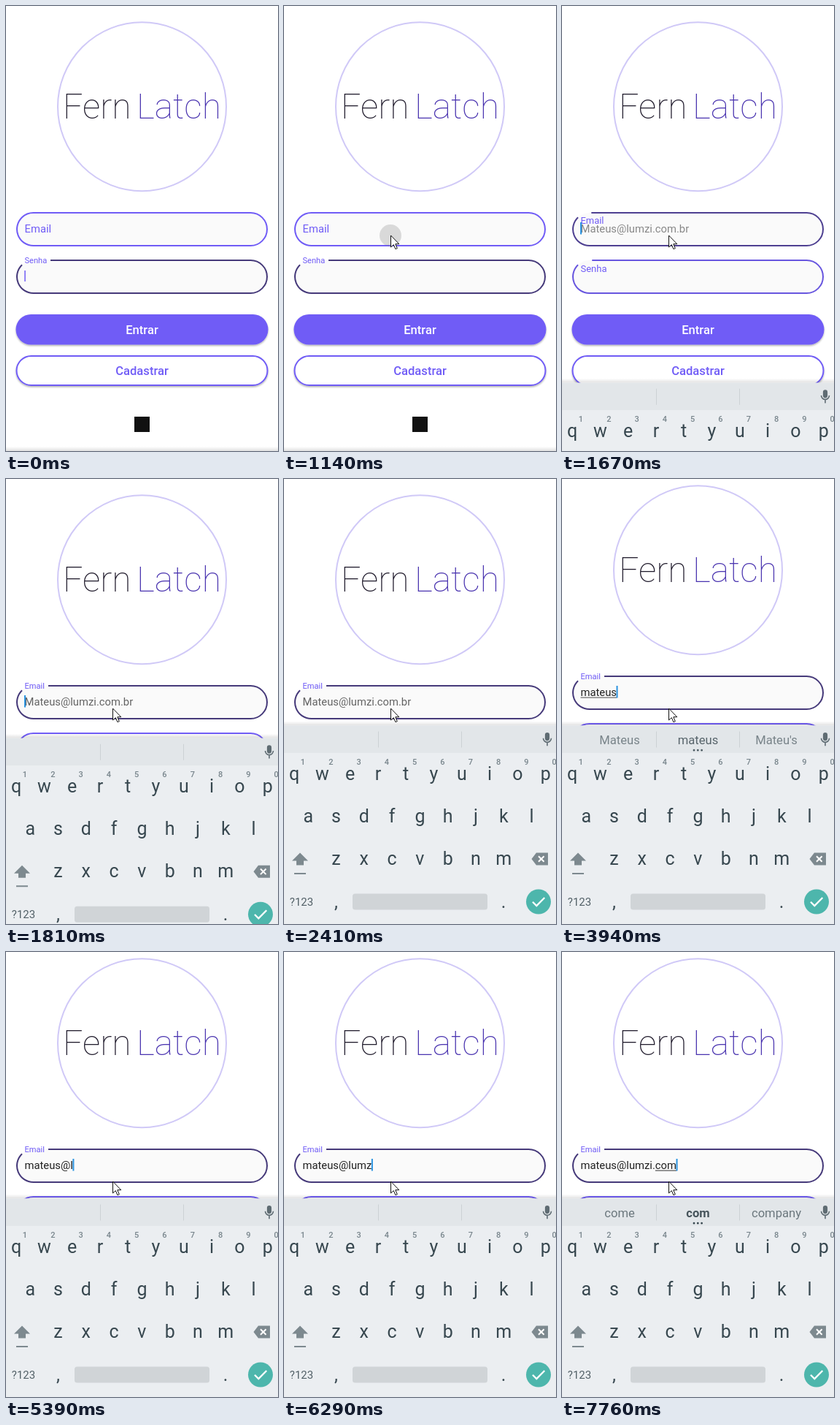
Animation of 373x609 px, one loop 8 s. Source, as an HTML page:

```html
<!DOCTYPE html>
<html lang="pt-BR">
<head>
<meta charset="utf-8">
<title>Login</title>
<style>
html, body { margin: 0; width: 100%; height: 100%; overflow: hidden; background: #fff; }
svg { display: block; width: 100%; height: 100%; font-family: Roboto, sans-serif; }
.mid { text-anchor: middle; }
.field { fill: #fafafa; }
.ring { fill: none; stroke-width: 2; }
.input { font-size: 14.8px; }
.label { fill: #705cf6; }
.btn { font-size: 16.6px; font-weight: 500; text-anchor: middle; }
#keys { fill: #37474f; }
#tips { font-size: 16.6px; text-anchor: middle; fill: #6b777d; }
.icon { fill: #7d898f; }
</style>
</head>
<body>
<svg viewBox="0 0 373 609">
  <defs>
    <linearGradient id="shade" x2="0" y2="1">
      <stop stop-opacity="0"/><stop offset="1" stop-opacity=".12"/>
    </linearGradient>
    <filter id="soft" x="-5%" y="-20%" width="110%" height="150%">
      <feDropShadow dx="0" dy="1.5" stdDeviation="1.1" flood-opacity=".32"/>
    </filter>
  </defs>

  <g id="page">
    <circle cx="186.5" cy="137.7" r="115.5" fill="none" stroke="#d0c9f7" stroke-width="2"/>
    <g font-size="48" font-weight="100">
      <text x="78" y="154" fill="#1f1a2b">Fern</text>
      <text x="179" y="154" fill="#4b35b0">Latch</text>
    </g>

    <rect class="field" x="15" y="283" width="343" height="45" rx="22.5"/>
    <path class="ring" id="emailRing"/>
    <text class="label" id="emailLabel" x="25.5">Email</text>
    <text class="input" id="hint" x="25.5" y="309.8">Mateus@lumzi.com.br</text>
    <text class="input" id="typed" x="25.5" y="309.8" fill="#212121"></text>
    <rect id="under" y="311.6" height="1" fill="#333"/>
    <rect id="caret" y="296" width="2" height="16.5" fill="#2a93e0"/>

    <rect class="field" x="15" y="348" width="343" height="45" rx="22.5"/>
    <path class="ring" id="passRing"/>
    <text class="label" id="passLabel" x="25.5">Senha</text>
    <rect id="passCaret" x="25.3" y="362" width="1.5" height="15" fill="#705cf6"/>

    <rect x="13.5" y="422" width="346" height="41.5" rx="20.75" fill="#705cf6" filter="url(#soft)"/>
    <text class="btn" x="186.5" y="449" fill="#fff">Entrar</text>
    <rect x="14.5" y="479" width="344" height="40" rx="20" fill="#fff" stroke="#705cf6" stroke-width="2" filter="url(#soft)"/>
    <text class="btn" x="186.5" y="505" fill="#705cf6">Cadastrar</text>
    <rect x="176" y="562" width="21" height="21" fill="#111"/>
  </g>

  <g id="board">
    <rect y="-6" width="373" height="6" fill="url(#shade)"/>
    <rect width="373" height="280" fill="#ebeef1"/>
    <rect width="373" height="37.3" fill="#e2e6e9"/>
    <path d="M129.5 8V30M243.5 8V30" stroke="#ccd1d4"/>
    <g fill="none" stroke="#5f6c73" stroke-width="1.6">
      <rect x="358.7" y="10.3" width="4.6" height="9.6" rx="2.3" fill="#5f6c73"/>
      <path d="M355.5 17.3a5.5 5.5 0 0 0 11 0M361 23v4.7"/>
    </g>
    <g id="tips">
      <text x="79" y="25.2"></text>
      <text x="186.5" y="25.2" fill="#46545b"></text>
      <text x="294" y="25.2"></text>
      <path d="M181 33.7h.01M186.3 33.7h.01M191.6 33.7h.01" stroke="#37474f" stroke-width="2.8" stroke-linecap="round"/>
    </g>
    <g id="keys"></g>
    <path class="icon" d="M22 174L33 185H27V191H17V185H11ZM14 201.5H30V203.5H14Z"/>
    <path class="icon" d="M346 174H362V191H346L339.5 182.5Z"/>
    <path d="M349 178.7l7.6 7.6m0-7.6l-7.6 7.6" stroke="#fff" stroke-width="2"/>
    <rect x="94" y="230" width="185" height="22" rx="3.5" fill="#d0d4d7"/>
    <circle cx="349" cy="241" r="17" fill="#4db6ac"/>
    <path d="M341 241.2l5.3 5.3 11-11" fill="none" stroke="#fff" stroke-width="2.3"/>
  </g>

  <circle id="tap" cx="146" cy="314" r="15" fill="#777" opacity=".25"/>
  <path id="mouse" d="M0 0V16L3.8 12.6L6.4 18.6L8.8 17.6L6.3 11.7H11.3Z" fill="#fff" stroke="#111" stroke-linejoin="round"/>
</svg>

<script>
const $ = id => document.getElementById(id);
const set = (el, attrs) => { for (const k in attrs) el.setAttribute(k, attrs[k]); };
const show = (el, on) => set(el, { visibility: on ? 'visible' : 'hidden' });
const ramp = (t, from, to) => Math.min(1, Math.max(0, (t - from) / (to - from)));
const mix = (a, b, p) => a + (b - a) * p;
const easeOut = p => 1 - (1 - p) ** 3;
const smooth = p => p * p * (3 - 2 * p);

const LOOP = 8000;
const DARK = [70, 58, 122], VIOLET = [112, 92, 246];
const tips = $('tips').querySelectorAll('text');

// Keystroke: time, character, suggestions
const strokes = [
  [2810, 'm', 'me m my'],
  [3050, 'a', 'may ma make'],
  [3300, 't', 'mat mat math'],
  [3470, 'e', 'mate mate mates'],
  [3670, 'u', 'Mateus mateu Mateo'],
  [3870, 's', "Mateus mateus Mateu's"],
  [4860, '@', ''],
  [5390, 'l', 'la l lol'],
  [5590, 'u', 'lua lu luz'],
  [5880, 'm', 'lume lum luma'],
  [6290, 'z', 'luma lumz lume'],
  [6420, 'i', 'lume lumzi lumia'],
  [6890, '.', ''],
  [7220, 'c', 'can c come'],
  [7420, 'o', 'cool co could'],
  [7620, 'm', 'come com company'],
];

function addKey(text, x, y, size, extra) {
  const el = document.createElementNS('http://www.w3.org/2000/svg', 'text');
  set(el, { x, y, 'font-size': size, class: 'mid', ...extra });
  el.textContent = text;
  $('keys').append(el);
}
[['qwertyuiop', 14, 74], ['asdfghjkl', 33.2, 132.3], ['zxcvbnm', 71.5, 190.6]].forEach(([row, x, y]) =>
  [...row].forEach((c, i) => addKey(c, x + i * 38.3, y, 25)));
[...'1234567890'].forEach((c, i) =>
  addKey(c, 26 + i * 38.3, 53.3, 11, { fill: '#78858c', 'font-weight': 500 }));
addKey('?123', 24, 246, 15, { fill: '#526067' });
addKey(',', 71.5, 249, 25);
addKey('.', 301, 249, 25);

// Rounded outline, open at the top left by the given gap
function outline(cy, gap) {
  const r = 22.5, top = cy - r;
  const yAt = x => x < 37.5 ? cy - Math.sqrt(r * r - (37.5 - x) ** 2) : top;
  const arc = (x, y) => `A${r} ${r} 0 0 1 ${x} ${y}`;
  const x = 22 + gap;
  return `M${x} ${yAt(x)}` + (x < 37.5 ? arc(37.5, top) : '') +
    `H335.5${arc(335.5, cy + r)}H37.5${arc(22, yAt(22))}`;
}

// float: 0 = label rests inside, 1 = label sits on the border; tint: 1 = focused colour
function drawField(name, cy, gap, float, tint) {
  const rgb = VIOLET.map((v, i) => Math.round(mix(v, DARK[i], tint)));
  set($(name + 'Ring'), { d: outline(cy, gap * float), stroke: `rgb(${rgb})` });
  set($(name + 'Label'), {
    y: mix(cy + 4.8, cy - 18.6, float),
    'font-size': mix(14.8, 11.1, float)
  });
}

function drawTyping(t) {
  const done = strokes.filter(s => s[0] <= t);
  const text = done.map(s => s[1]).join('');
  const [at, , list] = done.at(-1) || [1540, '', ''];
  const age = t - at;
  const words = list ? list.split(' ') : [];
  const shown = words.length ? ramp(age, 40, 75) : 0;

  $('typed').textContent = text;
  const width = text ? $('typed').getComputedTextLength() : 0;
  set($('caret'), { x: 25 + width });
  show($('caret'), t >= 1540 && age < (text ? 530 : 870));

  const word = text.split(/[@.]/).pop();
  const start = text.length - word.length;
  const before = start ? $('typed').getSubStringLength(0, start) : 0;
  set($('under'), { x: 25.5 + before, width: Math.max(0, width - before), opacity: shown });

  tips.forEach((el, i) => el.textContent = words[i] || '');
  set(tips[1], { 'font-weight': words[1] === 'com' ? 700 : 400 });
  set($('tips'), { opacity: shown });
}

function draw(t) {
  const focus = smooth(ramp(t, 1570, 1770));
  const tint = smooth(ramp(t, 1540, 1720));
  drawField('email', 305.5, 36, focus, tint);
  drawField('pass', 370.5, 39, 1 - focus, 1 - tint);
  show($('passCaret'), t < 910);
  set($('hint'), { opacity: 0.6 * ramp(t, 1520, 1720) * (1 - ramp(t, 2810, 3115)) });

  drawTyping(t);

  const scroll = 13 * easeOut(ramp(t, 2810, 3250));
  set($('page'), { transform: `translate(0 ${-scroll})` });
  const top = mix(609, 337.5, easeOut(ramp(t, 1632, 1930)));
  set($('board'), { transform: `translate(0 ${top})` });

  const p = smooth(ramp(t, 310, 940));
  set($('mouse'), { transform: `translate(${mix(301, 146.5, p)} ${mix(570, 314, p)})` });
  show($('mouse'), t >= 310);
  show($('tap'), t >= 1140 && t < 1270);
}

const begin = performance.now();
function tick() {
  draw((performance.now() - begin) % LOOP);
  requestAnimationFrame(tick);
}
tick();
</script>
</body>
</html>
```
